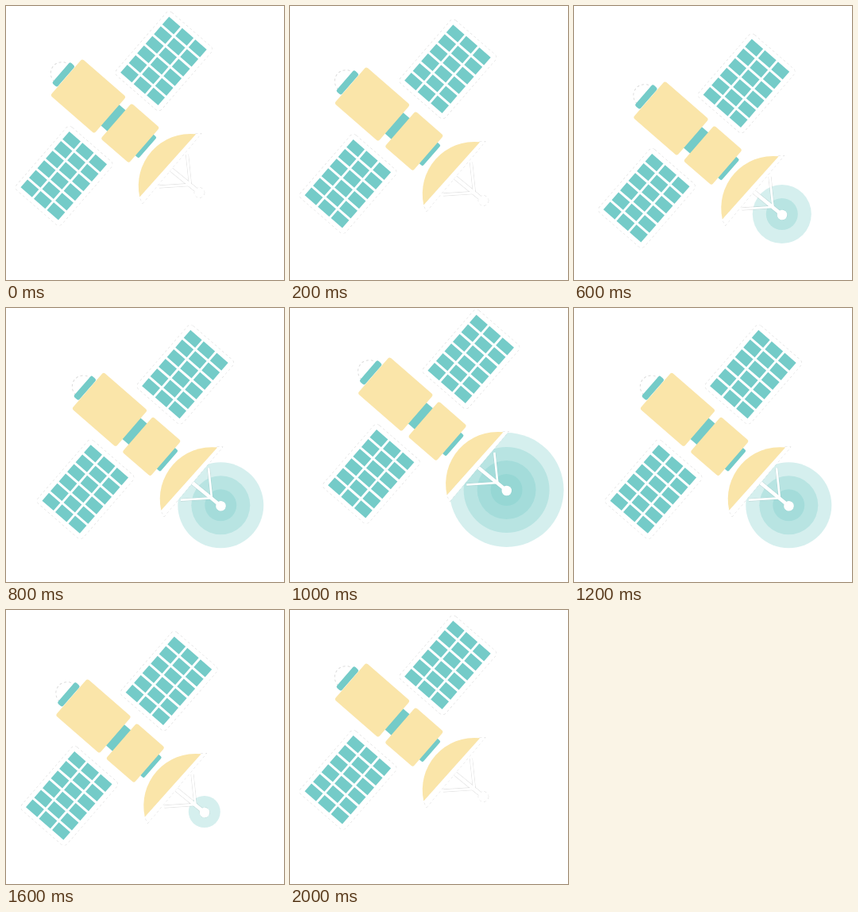
Write an HTML page with a canvas that moves like this. It is 350x345 px and loops after 2.2 s.

```html
<!DOCTYPE html>
<html lang="en">
<head>
<meta charset="utf-8">
<title>Satellite</title>
<style>
  html, body { margin: 0; width: 100%; height: 100%; overflow: hidden; background: #fff; }
  canvas { display: block; }
</style>
</head>
<body>
<canvas id="stage" width="350" height="345"></canvas>
<script>
const ctx = document.getElementById('stage').getContext('2d');
const TEAL = '#74cbc8', YELLOW = '#fae5a9', EDGE = 'rgba(0,0,0,.14)';
const STEP_MS = 200, STEPS = 11;

// Drift of the satellite on the way out; the way back mirrors it.
const drift = [[0, 0], [0, 10], [6.5, 20], [18.5, 28], [27, 14.3], [29.3, -5]];
const ringRadii = [20, 37, 54, 72];
const signal = [243.3, 234];

const rim = new Path2D('M238.5 160.5H246L172 248.5L168 240.5Z');
const dish = new Path2D('M239.2 161.3A65.5 65.5 0 0 0 168.3 240.5Z');
const ball = new Path2D();
ball.arc(243.5, 235, 6.3, 0, 7);
const struts = [
  [2.6, new Path2D('M228 187L232 225L193 227.5')],
  [4.5, new Path2D('M208 206L243.5 235')]
];

function box(color, x, y, w, h, r) {
  ctx.fillStyle = color;
  ctx.beginPath();
  ctx.roundRect(x, y, w, h, r);
  ctx.fill();
}

function faintEdge(path) {
  ctx.strokeStyle = EDGE;
  ctx.lineWidth = 1;
  ctx.setLineDash([3, 3]);
  ctx.stroke(path);
  ctx.setLineDash([]);
}

function panel(top) {
  const frame = new Path2D();
  frame.roundRect(5.5, top - 6, 75, 105, 5);
  faintEdge(frame);
  ctx.fillStyle = '#fff';
  ctx.fill(frame);
  for (let col = 0; col < 3; col++)
    for (let row = 0; row < 6; row++)
      box(TEAL, 11.2 + col * 21.9, top + row * 16.05, 19, 13, 0);
}

function drawBody() {
  ctx.save();
  ctx.translate(103.5, 113.5);
  ctx.rotate(41 * Math.PI / 180);
  panel(-142.3);
  panel(49.2);
  const cap = new Path2D();
  cap.arc(-44, 0, 14, Math.PI / 2, Math.PI * 1.5);
  faintEdge(cap);
  box(TEAL, -45.5, -17.5, 8.5, 35, 2.5);
  box(TEAL, 36, -17.5, 12, 35, 0);
  box(TEAL, 92.5, -17.5, 6.8, 35, 2);
  box(YELLOW, -36.7, -30.5, 73.4, 61, 3);
  box(YELLOW, 46.9, -29, 47, 59, 3);
  ctx.restore();
}

function drawStruts(color, extra) {
  ctx.strokeStyle = color;
  for (const [width, path] of struts) {
    ctx.lineWidth = width + extra;
    ctx.stroke(path);
  }
}

function drawRings(count) {
  ctx.fillStyle = TEAL;
  ctx.globalAlpha = 0.3;
  for (const radius of ringRadii.slice(0, Math.max(0, count))) {
    ctx.beginPath();
    ctx.arc(...signal, radius, 0, 7);
    ctx.fill();
  }
  ctx.globalAlpha = 1;
}

function drawAntenna(ringCount) {
  faintEdge(rim);
  faintEdge(ball);
  drawStruts(EDGE, 1.2);
  drawStruts('#fff', 0);
  drawRings(ringCount);
  drawStruts('#fff', 0);
  ctx.fillStyle = '#fff';
  ctx.fill(rim);
  ctx.fill(ball);
  ctx.fillStyle = YELLOW;
  ctx.fill(dish);
}

function draw() {
  const step = Math.floor(performance.now() / STEP_MS) % STEPS;
  const pose = 5 - Math.abs(5 - step);
  ctx.fillStyle = '#fff';
  ctx.fillRect(0, 0, 350, 345);
  ctx.save();
  ctx.translate(...drift[pose]);
  drawBody();
  drawAntenna(pose - 1);
  ctx.restore();
  requestAnimationFrame(draw);
}
draw();
</script>
</body>
</html>
```
